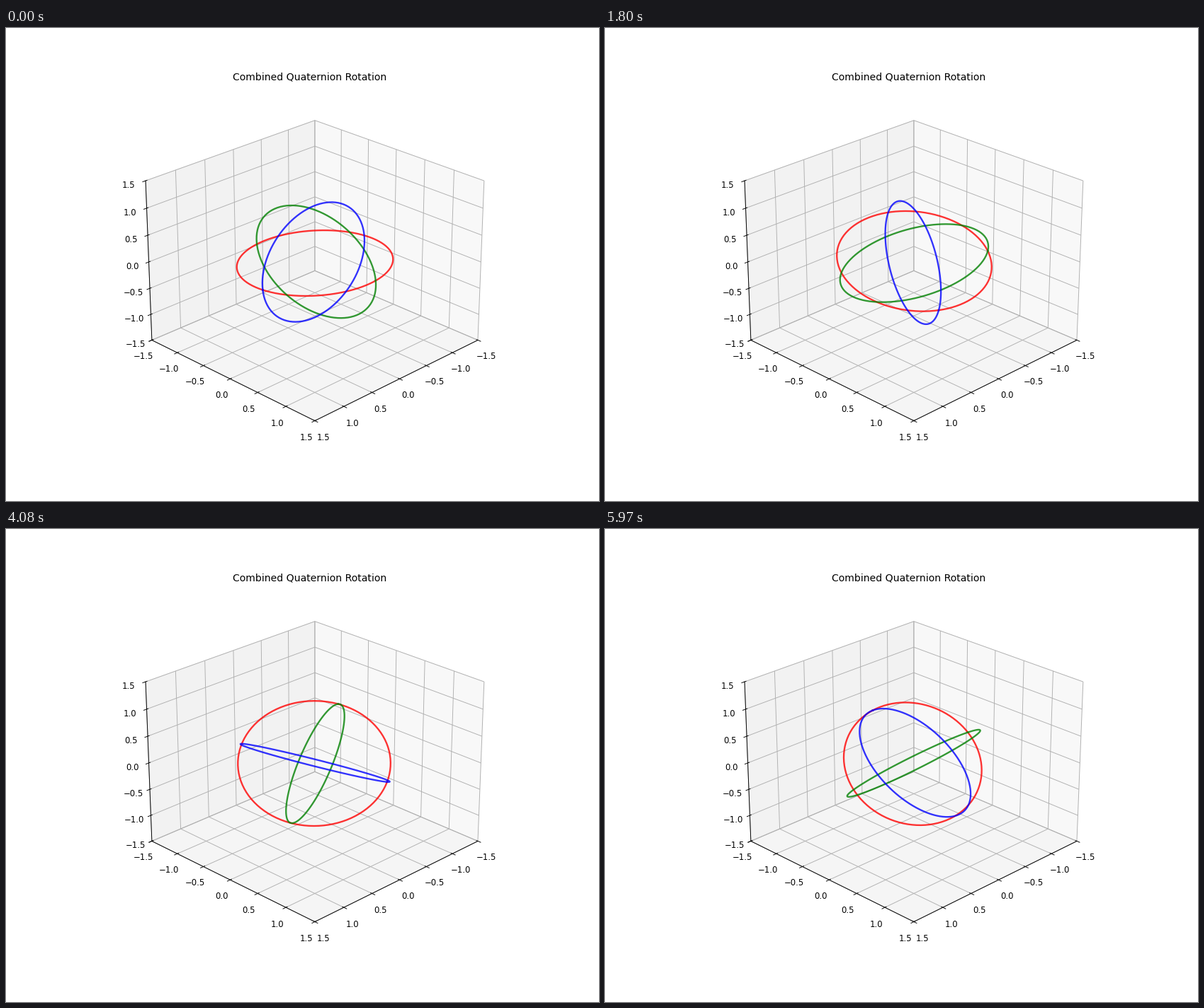
These frames come from a looping animation (837 px wide and 669 px high, 6000 ms). A matplotlib script:

```python
import numpy as np
import matplotlib.pyplot as plt
from matplotlib.animation import FuncAnimation

WIDTH, HEIGHT, DPI = 837, 669, 83.7
FRAMES, INTERVAL = 200, 30
RATES = (0.03, 0.02, 0.04)  # radians per step about x, y, z
LEAD = 2  # steps already turned when the loop starts


def axis_quat(axis, angle):
    q = np.zeros(4)
    q[0] = np.cos(angle / 2)
    q[axis + 1] = np.sin(angle / 2)
    return q


def quat_mul(a, b):
    w = a[0] * b[0] - a[1:] @ b[1:]
    v = a[0] * b[1:] + b[0] * a[1:] + np.cross(a[1:], b[1:])
    return np.r_[w, v]


def rotate(q, points):
    t = 2 * np.cross(q[1:], points)
    return points + q[0] * t + np.cross(q[1:], t)


u = np.linspace(0, 2 * np.pi, 100)
c, s, o = np.cos(u), np.sin(u), np.zeros_like(u)
rings = [
    ("red", np.column_stack([c, s, o])),
    ("green", np.column_stack([o, c, s])),
    ("blue", np.column_stack([c, o, s])),
]

fig = plt.figure(figsize=(WIDTH / DPI, HEIGHT / DPI), dpi=DPI)
ax = fig.add_subplot(projection="3d")
ax.set(xlim=(-1.5, 1.5), ylim=(-1.5, 1.5), zlim=(-1.5, 1.5))
ax.set_title("Combined Quaternion Rotation")
ax.view_init(elev=25, azim=45)
lines = [ax.plot(*pts.T, color=color, lw=2, alpha=0.8)[0] for color, pts in rings]


def update(i):
    qx, qy, qz = (axis_quat(k, r * (i + LEAD)) for k, r in enumerate(RATES))
    q = quat_mul(qz, quat_mul(qy, qx))
    for line, (_, pts) in zip(lines, rings):
        line.set_data_3d(*rotate(q, pts).T)
    return lines


anim = FuncAnimation(fig, update, frames=FRAMES, interval=INTERVAL, repeat=True)
plt.show()
```
